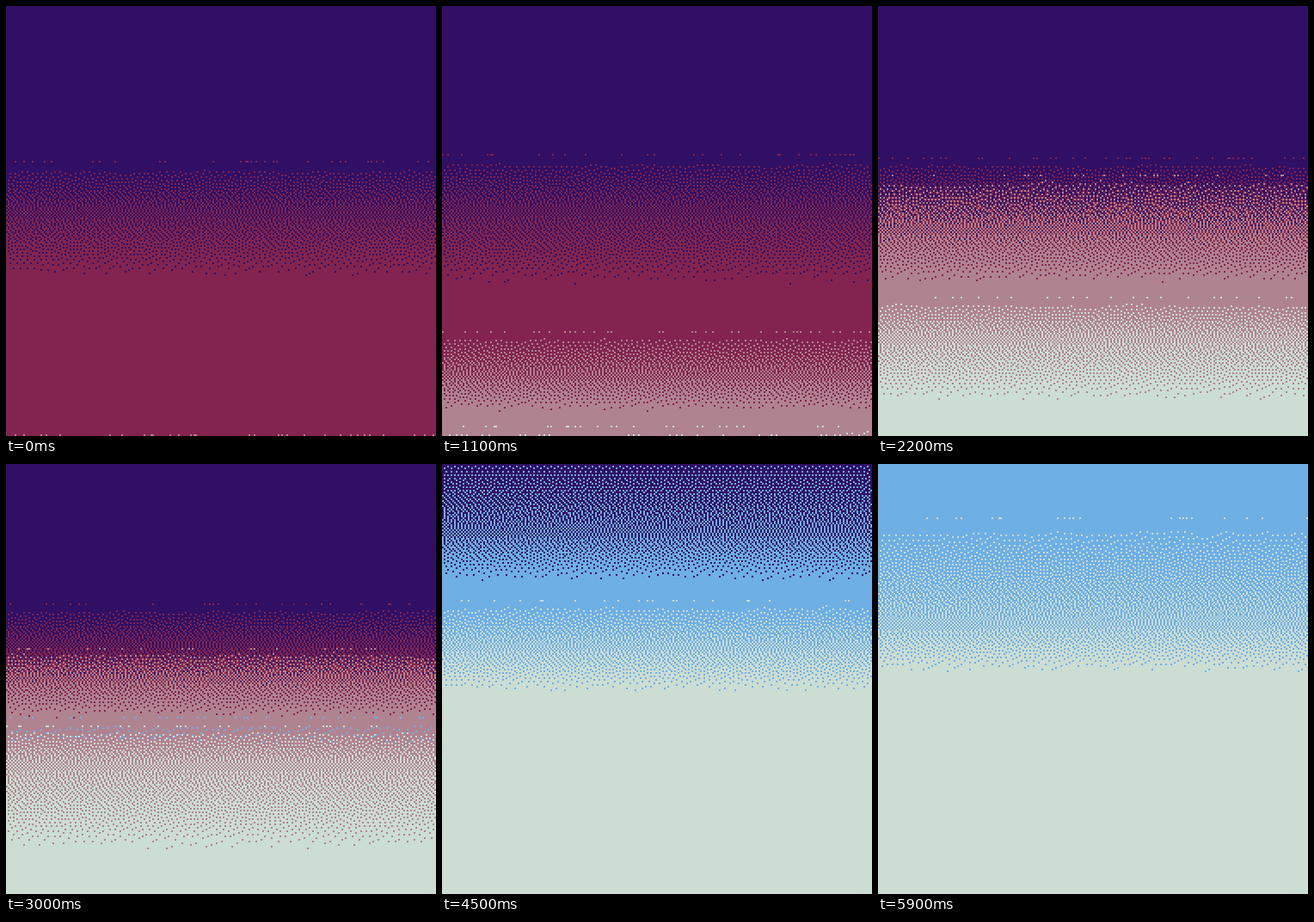
An HTML page with a canvas that plays this animation: 500 by 500 pixels, repeating every 6 s.

```html
<!DOCTYPE html>
<html>
<head>
<meta charset="utf-8">
<style>
html, body { margin: 0; width: 100%; height: 100%; overflow: hidden; background: #300f64; }
canvas { display: block; width: 500px; height: 500px; image-rendering: pixelated; }
</style>
</head>
<body>
<canvas width="250" height="250"></canvas>
<script>
const SIZE = 250, LOOP = 6000, STEP = 100;
const NIGHT = [48, 15, 100];
const COLORS = [[130, 36, 79], [176, 131, 145], [110, 175, 228], [204, 221, 211]];

// Each band: heights of 0%, 50% and 100% coverage, then an optional fade-out range.
const key = (time, pale, blue, mauve = blue, maroon = mauve) =>
  ({ time, bands: [maroon, mauve, blue, pale] });
const noBlue = [330, 397, 467, 300, 325];
const keys = [
  key(0, [640, 690, 740], noBlue, [496, 590, 680], [179, 238, 316]),
  key(1100, [486, 540, 590], noBlue, [376, 429, 472], [171, 236, 323]),
  key(2200, [337, 385, 460], noBlue, [194, 258, 323], [174, 226, 280]),
  key(3000, [302, 348, 450], [293, 360, 430, 300, 325], [212, 248, 295], [160, 207, 262]),
  key(3700, [235, 275, 396], [146, 222, 275, 240, 300], [166, 200, 234]),
  key(4200, [187, 228, 290], [-8, 100, 168, 500, 600]),
  key(4500, [156, 211, 266], [-35, 78, 138, 500, 600]),
  key(5000, [108, 199, 251], [-120, 10, 95, 500, 600]),
  key(5600, [57, 186, 244], [-200, -100, -2, 500, 600]),
  key(5900, [61, 185, 243], [-200, -100, -2, 500, 600])
];

let seed = 7;
const noise = Array.from({ length: 65537 }, () => {
  seed = (seed * 1664525 + 1013904223) % 4294967296;
  return (seed / 4294967296 - 0.5) * 1.4;
});

const lerp = (a, b, k) => a + (b - a) * k;
const ramp = (y, a, b) => Math.min(1, Math.max(0, (y - a) / (b - a)));

function bandsAt(time) {
  let i = 0;
  while (i < keys.length - 2 && time >= keys[i + 1].time) i++;
  const from = keys[i], to = keys[i + 1];
  const k = ramp(time, from.time, to.time);
  return from.bands.map((band, b) => band.map((v, n) => lerp(v, to.bands[b][n] ?? v, k)));
}

function coverage([start, mid, end, fadeStart, fadeEnd], y) {
  const c = (ramp(y, start, mid) + ramp(y, mid, end)) / 2;
  return fadeEnd ? c * (1 - ramp(y, fadeStart, fadeEnd)) : c;
}

const ctx = document.querySelector('canvas').getContext('2d');
const image = ctx.createImageData(SIZE, SIZE);

function plot(x, y, color) {
  const p = (y * SIZE + x) * 4;
  image.data.set(color, p);
  image.data[p + 3] = 255;
}

// Floyd-Steinberg error diffusion; solid rows restart it with random error.
function ditherBand(band, color) {
  let row = new Float32Array(SIZE + 2);
  for (let y = 0; y < SIZE; y++) {
    const c = coverage(band, y * 2);
    const next = new Float32Array(SIZE + 2);
    for (let x = 0; x < SIZE; x++) {
      if (c <= 0 || c >= 1) {
        if (c >= 1) plot(x, y, color);
        next[x + 1] = noise[y * SIZE + x];
        continue;
      }
      const value = c + row[x + 1];
      const on = value > 0.5;
      const error = (value - on) / 16;
      if (on) plot(x, y, color);
      row[x + 2] += error * 7;
      next[x] += error * 3;
      next[x + 1] += error * 5;
      next[x + 2] += error;
    }
    row = next;
  }
}

function draw(time) {
  for (let y = 0; y < SIZE; y++)
    for (let x = 0; x < SIZE; x++) plot(x, y, NIGHT);
  bandsAt(time).forEach((band, i) => ditherBand(band, COLORS[i]));
  ctx.putImageData(image, 0, 0);
}

const begin = performance.now();
let shown = -1;
function tick() {
  const time = Math.floor((performance.now() - begin) % LOOP / STEP) * STEP;
  if (time !== shown) draw(shown = time);
  requestAnimationFrame(tick);
}
tick();
</script>
</body>
</html>
```
